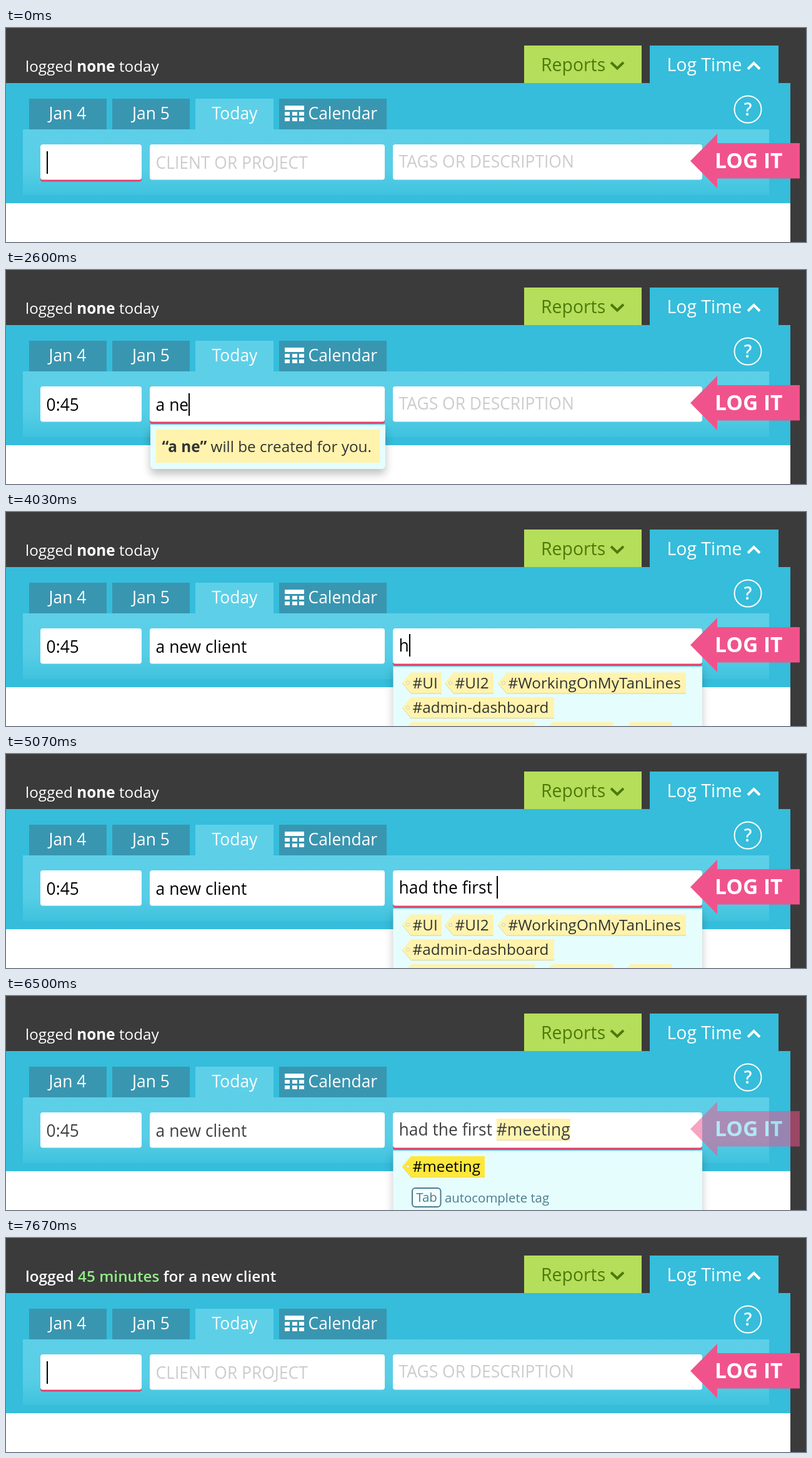
An HTML page for the animation above (8 s loop, 1280x342 px).

```html
<!DOCTYPE html>
<html lang="en">
<head>
<meta charset="utf-8">
<title>Log time</title>
<style>
html, body { margin: 0; width: 100%; height: 100%; overflow: hidden; background: #fff; }
svg { display: block; font-family: "Open Sans", sans-serif; font-size: 26.4px; }
.white { fill: #fff; }
.mid { text-anchor: middle; }
.small { font-size: 24.3px; }
.list { font-size: 23px; fill: #333; }
.hint { font-size: 20.4px; fill: #4a7c8c; }
.line { fill: none; stroke-width: 4; }
.field text { white-space: pre; }
.panel { fill: #e6fdfe; filter: drop-shadow(0 6px 7px rgba(0,0,0,.22)); }
foreignObject { overflow: visible; }
.note { background: #e6fdfe; padding: 8px 9px 10px; border-radius: 0 0 6px 6px; box-shadow: 0 8px 14px rgba(0,0,0,.25); }
.note p { margin: 0; padding: 9.5px 10px; background: #fff3ad; color: #333; font-size: 24.3px; line-height: 34px; }
</style>
</head>
<body>
<svg id="stage" width="1280" height="342" viewBox="0 0 1280 342">
  <defs>
    <linearGradient id="glow" x2="0" y2="1">
      <stop offset="0" stop-color="#5dd0e8"/><stop offset=".6" stop-color="#58cee6"/><stop offset="1" stop-color="#3fc2de"/>
    </linearGradient>
  </defs>
  <rect width="1280" height="342" fill="#3b3b3b"/>
  <rect y="279" width="1255" height="63" class="white"/>
  <path d="M0 88H1030V28H1236V88H1255V280H0z" fill="#35bddb"/>
  <rect x="829" y="28" width="188" height="60" fill="#b5de5b"/>
  <g font-size="28.4">
    <text x="856" y="69" fill="#4c7a08">Reports</text>
    <text x="1057.5" y="69" class="white">Log Time</text>
  </g>
  <path d="M968 55L978 64.5L988 55" class="line" stroke="#4c7a08"/>
  <path d="M1187 65.5L1196.5 56L1206 65.5" class="line" stroke="#fff"/>

  <g class="small white">
    <text id="before" x="31" y="70">logged <tspan font-weight="700">none</tspan> today</text>
    <text id="after" x="31" y="70" font-weight="600">logged <tspan fill="#93ee88">45 minutes</tspan> for a new client</text>
  </g>

  <path d="M37 113h124v49h-124zM170 113h124v49h-124zM437 113h172v49h-172z" fill="#3996b1"/>
  <rect x="303" y="113" width="125" height="50" fill="#5dd0e8"/>
  <rect x="27" y="162" width="1194" height="105" fill="url(#glow)"/>
  <g class="white">
    <text x="98.5" y="146" class="mid">Jan 4</text>
    <text x="232" y="146" class="mid">Jan 5</text>
    <text x="366" y="146" class="mid">Today</text>
    <text x="483.5" y="146">Calendar</text>
    <path d="M446 124h31v7h-31zM446 134h8v6h-8zM458 134h8v6h-8zM469 134h8v6h-8zM446 143h8v6h-8zM458 143h8v6h-8zM469 143h8v6h-8z"/>
    <text x="1187" y="140" class="mid" font-size="28" font-weight="600">?</text>
  </g>
  <circle cx="1187" cy="130" r="21.5" fill="none" stroke="#fff" stroke-width="2"/>

  <g id="fields"></g>

  <g id="clients">
    <rect x="230.5" y="247" width="376" height="120" class="panel"/>
    <rect x="240" y="304" width="357" height="2" fill="#cde8ee"/>
    <circle cx="256.5" cy="282" r="7.8" fill="#4fc0e8"/>
    <circle cx="256.5" cy="332" r="7.8" fill="#7445cb"/>
    <text x="270.5" y="288" class="list">Bikes</text>
    <text x="270.5" y="338" class="list">Pell GmbH</text>
  </g>
  <foreignObject id="create" x="230.5" y="247" width="376" height="200">
    <div class="note"><p><b id="quoted"></b> will be created for you.</p></div>
  </foreignObject>

  <g id="tagPanel">
    <rect x="619.5" y="247" width="494.5" height="130" class="panel"/>
    <g id="allTags"></g>
    <g id="oneTag">
      <rect x="650" y="307" width="45.5" height="30" rx="5" fill="#f4ffff" stroke="#4a7c8c" stroke-width="2"/>
      <text x="673" y="329" class="hint mid">Tab</text>
      <text x="702" y="329.5" class="hint">autocomplete tag</text>
    </g>
  </g>

  <g id="button">
    <path d="M1095 212.5L1138 169V184H1270V240.500H1138V256z" fill="#f0538b"/>
    <text x="1134" y="223.500" class="white" font-size="33.5" font-weight="700">LOG IT</text>
  </g>
</svg>
<script>
const LOOP = 8000, TICK = 130;
const $ = id => document.getElementById(id);
const clamp = v => Math.max(0, Math.min(1, v));
const show = (el, on) => el.style.display = on ? '' : 'none';

function add(parent, name, attrs, text = '') {
  const el = document.createElementNS('http://www.w3.org/2000/svg', name);
  for (const key in attrs) el.setAttribute(key, attrs[key]);
  el.textContent = text;
  return parent.appendChild(el);
}

function addTag(parent, x, right, y, text, fill, ink) {
  const shape = `M${x} ${y + 16.5}L${x + 14} ${y}H${right}V${y + 33}H${x + 14}z`;
  add(parent, 'path', { d: shape, fill: '#d9d494', transform: 'translate(0 1)' });
  add(parent, 'path', { d: shape, fill });
  add(parent, 'circle', { cx: x + 9, cy: y + 16.5, r: 2.5, fill: '#e6fdfe', stroke: '#ddd08a' });
  add(parent, 'text', { x: x + 16.5, y: y + 25, class: 'small', fill: ink }, text);
}

for (const [x, right, y, text] of [
  [634, 697, 256.5, '#UI'], [702, 780, 256.5, '#UI2'], [787, 1088, 256.5, '#WorkingOnMyTanLines'],
  [634, 877, 296, '#admin-dashboard'],
  [634, 846, 336, '#client-support'], [860, 971, 336, '#design'], [985, 1065, 336, '#email']
]) addTag($('allTags'), x, right, y, text, '#fff3ad', '#333');
addTag($('oneTag'), 634, 766, 256, '#meeting', '#ffe83a', '#000');

// counts: characters visible at each tick after start
function makeField(x, width, baseline, hint, value, start, counts) {
  const g = add($('fields'), 'g', { class: 'field' });
  const underline = add(g, 'rect', { x, y: 186, width, height: 59.5, rx: 4, fill: '#e0436f' });
  add(g, 'rect', { x, y: 186, width, height: 56.5, rx: 4, fill: '#fff' });
  const left = x + 9.6;
  const mark = add(g, 'rect', { y: baseline - 27, height: 35, fill: '#fff3ad' });
  const edge = add(g, 'rect', { y: baseline + 7, height: 1, fill: '#e3d992' });
  const placeholder = add(g, 'text', { x: left, y: baseline, fill: '#ccc' }, hint);
  const text = add(g, 'text', { x: left, y: baseline });
  const caret = add(g, 'rect', { y: baseline - 28, width: 2, height: 36 });
  const hash = value.indexOf('#');

  return (t, focused, caretOn, ink) => {
    const tick = Math.floor((t - start) / TICK);
    const typed = tick < 0 || t >= 6760 ? '' : value.slice(0, counts[Math.min(tick, counts.length - 1)]);
    text.textContent = typed;
    text.setAttribute('fill', ink);
    const length = typed ? text.getComputedTextLength() : 0;
    caret.setAttribute('x', Math.round(left + length));
    show(underline, focused);
    show(caret, focused && caretOn);
    show(placeholder, !typed && !focused);
    const marked = hash >= 0 && typed.length > hash;
    const from = marked ? text.getSubStringLength(0, hash) : 0;
    for (const el of [mark, edge]) {
      el.setAttribute('x', left + from);
      el.setAttribute('width', marked ? length - from : 0);
    }
    return typed;
  };
}

const fields = [
  makeField(55, 162, 225, '', '0:45', 1040, [1, 1, 2, 2, 4]),
  makeField(230, 376, 225, 'CLIENT OR PROJECT', 'a new client', 2340, [1, 3, 4, 5, 7, 9, 10, 11, 12]),
  makeField(619, 495, 223, 'TAGS OR DESCRIPTION', 'had the first #meeting', 4030,
    [1, 3, 4, 6, 7, 9, 10, 12, 14, 14, 15, 16, 17, 18, 19, 20, 22])
];

function draw(now) {
  const t = Math.floor(now % LOOP / TICK) * TICK;
  const within = (a, b) => t >= a && t < b;
  const focus = within(1820, 3640) ? 1 : within(3640, 6760) ? 2 : 0;
  const caretOn = !(within(390, 910) || within(6240, 6760) || within(7150, 7670));

  // the form dims while it is sent, then recovers
  const sending = clamp((t - 6110) / 390);
  const done = t < 6760 ? 0 : clamp((t - 6630) / 650);
  const shade = Math.round(64 * sending);
  const ink = `rgb(${shade},${shade},${shade})`;
  $('button').setAttribute('opacity', 1 - 0.47 * sending * (1 - done));

  const [, client, note] = fields.map((update, i) => update(t, i === focus, caretOn, ink));

  show($('clients'), focus === 1 && !client);
  show($('create'), focus === 1 && client);
  $('quoted').textContent = `“${client}”`;

  const matching = note.length > 15;
  show($('tagPanel'), focus === 2);
  show($('allTags'), !matching);
  show($('oneTag'), matching);

  show($('before'), t < 6760);
  $('after').setAttribute('opacity', done);
  requestAnimationFrame(draw);
}
draw(0);
</script>
</body>
</html>
```
